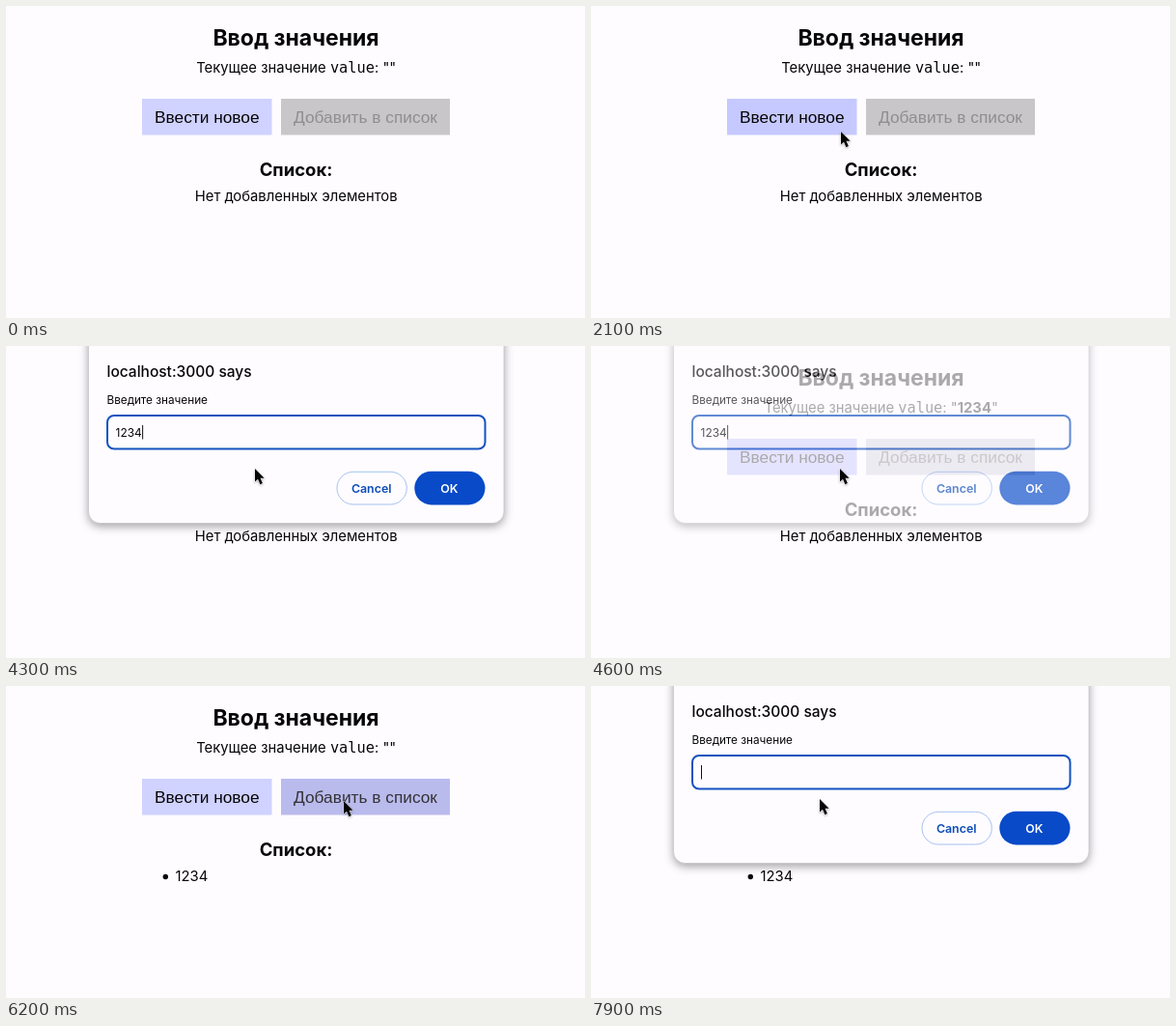
Recreate the animation shown at these times as an HTML page. Size 600 px wide and 323 px high, loop 8000 ms.

```html
<!DOCTYPE html>
<html lang="ru">
<head>
<meta charset="utf-8">
<title>Ввод значения</title>
<style>
  html, body { margin: 0; width: 100%; height: 100%; overflow: hidden; background: #fefcff; }
  svg { display: block; width: 100%; height: 100%; }
  text { font-family: Inter, "Noto Sans", sans-serif; font-size: 14.8px; fill: #060507; }
  .mid { text-anchor: middle; }
  .bold { font-weight: 700; }
  .mono { font-family: "DejaVu Sans Mono", monospace; font-size: 15.3px; }
  .button { font-family: "Liberation Sans", Arial, sans-serif; font-size: 17.3px; }
  .label { font-size: 12.4px; font-weight: 600; }
  #panel { filter: drop-shadow(0 3px 5px rgba(0, 0, 0, .36)); }
  #cursor { filter: drop-shadow(0 1px 1px rgba(0, 0, 0, .3)); }
</style>
</head>
<body>
<svg viewBox="0 0 600 323">
  <rect width="600" height="323" fill="#fefcff"/>
  <text class="mid bold" x="300.5" y="41.3" style="font-size:23px">Ввод значения</text>
  <text class="mid" x="300.7" y="69">Текущее значение <tspan class="mono">value</tspan>: "<tspan id="value" class="bold"></tspan>"</text>

  <rect id="enter" x="141" y="96" width="134.5" height="37.5"/>
  <text class="mid button" x="208.3" y="121">Ввести новое</text>
  <rect id="add" x="285" y="96" width="175" height="37.5"/>
  <text id="addText" class="mid button" x="372.5" y="121">Добавить в список</text>

  <text class="mid bold" x="300.5" y="175.6" style="font-size:18.5px">Список:</text>
  <text id="empty" class="mid" x="300.7" y="202">Нет добавленных элементов</text>
  <g id="item">
    <circle cx="165.3" cy="197.5" r="2.7" fill="#060507"/>
    <text x="175.5" y="202">1234</text>
  </g>

  <g id="dialog">
    <rect id="panel" x="85.5" y="-30" width="430.5" height="213.5" rx="12" fill="#fefcff" stroke="#c4c2c8" stroke-width=".7"/>
    <text x="104.5" y="32" style="font-size:15.5px;font-weight:500">localhost:3000 says</text>
    <text x="104.5" y="59.6" style="font-size:11.75px">Введите значение</text>
    <rect x="105" y="72" width="391.5" height="34.5" rx="7" fill="#fefcff" stroke="#1353bf" stroke-width="2"/>
    <text id="typed" x="113.6" y="93.6" style="font-size:11.9px"></text>
    <rect id="caret" y="82" width="1" height="14.5" fill="#111"/>
    <rect x="343" y="130.3" width="72.3" height="33.7" rx="16.8" fill="#fefcff" stroke="#a5c2f0"/>
    <text class="mid label" x="378.7" y="151.7" style="fill:#0c4cb8">Cancel</text>
    <rect x="423.3" y="129.8" width="73.2" height="34.6" rx="17.3" fill="#084ac8"/>
    <text class="mid label" x="459.3" y="151.7" style="fill:#fff">OK</text>
  </g>

  <path id="cursor" d="M0 0V13.6L3 10.8L5.4 16.2L7.9 15.1L5.5 9.8H9.7Z" fill="#050505" stroke="#fff" stroke-width="1" paint-order="stroke"/>
</svg>
<script>
const $ = id => document.getElementById(id);
const LOOP = 8000, STEP = 100;
const LIGHT = [208, 210, 255], HOVER = [179, 182, 255], GREY = [200, 198, 200];
const TEXT = [6, 5, 7], DIM = [144, 141, 145];
const KEY_TIMES = [3500, 3800, 4100, 4300];
const SUBMIT = 4600, ADDED = 6200;

// time, x, y of the pointer tip
const PATH = [
  [1900, 290, 115], [2000, 262, 135], [2100, 259, 130], [2300, 258, 127],
  [5100, 258, 127], [5200, 265, 127], [5300, 278, 125], [5500, 365, 121],
  [5700, 385, 179], [6000, 350, 119], [6300, 350, 119], [6700, 262, 120],
  [7000, 239, 117], [7100, 237, 117], [LOOP, 237, 117]
];

const ramp = (t, from, to) => Math.min(1, Math.max(0, (t - from) / (to - from)));
const mix = (a, b, k) => a.map((v, i) => v + (b[i] - v) * k);
const rgb = c => `rgb(${c.map(Math.round)})`;

function ellipse(cx, cy, rx, ry, degrees) {
  const a = degrees * Math.PI / 180;
  return [cx + rx * Math.cos(a), cy - ry * Math.sin(a)];
}

function pointer(t) {
  if (t < 1000) return ellipse(326, 180, 171, 72, 163 + 300 * ramp(t, 100, 900));
  if (t < 1900) return ellipse(340, 167, 145, 55, 193 + 277 * ramp(t, 1100, 1900));
  const i = PATH.findIndex(p => p[0] > t);
  const [t0, ...a] = PATH[i - 1], [t1, ...b] = PATH[i];
  return mix(a, b, ramp(t, t0, t1));
}

function draw(t) {
  const filled = t >= SUBMIT && t < ADDED;
  const enterHover = ramp(t, 2000, 2300) - ramp(t, 5300, 5600) + ramp(t, 6500, 6800);
  const addHover = ramp(t, 5300, 5500) - ramp(t, 5500, 5700) + ramp(t, 5800, 6000);
  const disabled = 1 - ramp(t, 4500, 4800) + ramp(t, 6100, 6400);

  $("value").textContent = filled ? "1234" : "";
  $("enter").setAttribute("fill", rgb(mix(LIGHT, HOVER, enterHover)));
  $("add").setAttribute("fill", rgb(mix(mix(LIGHT, HOVER, addHover), GREY, disabled)));
  $("addText").style.fill = rgb(mix(TEXT, DIM, disabled));
  $("empty").style.display = t < ADDED ? "" : "none";
  $("item").style.display = t < ADDED ? "none" : "";

  $("dialog").style.opacity = ramp(t, 2400, 2700) - ramp(t, 4500, 4800) + ramp(t, 7000, 7300);
  const count = t < 5000 ? KEY_TIMES.filter(k => k <= t).length : 0;
  $("typed").textContent = "1234".slice(0, count);
  $("caret").setAttribute("x", 114 + (count ? $("typed").getComputedTextLength() : 0));

  $("cursor").style.display = t < 100 ? "none" : "";
  $("cursor").setAttribute("transform", `translate(${pointer(t)})`);
}

const start = performance.now();
function tick() {
  const t = (performance.now() - start) % LOOP;
  draw(Math.floor(t / STEP) * STEP);
  requestAnimationFrame(tick);
}
tick();
</script>
</body>
</html>
```
